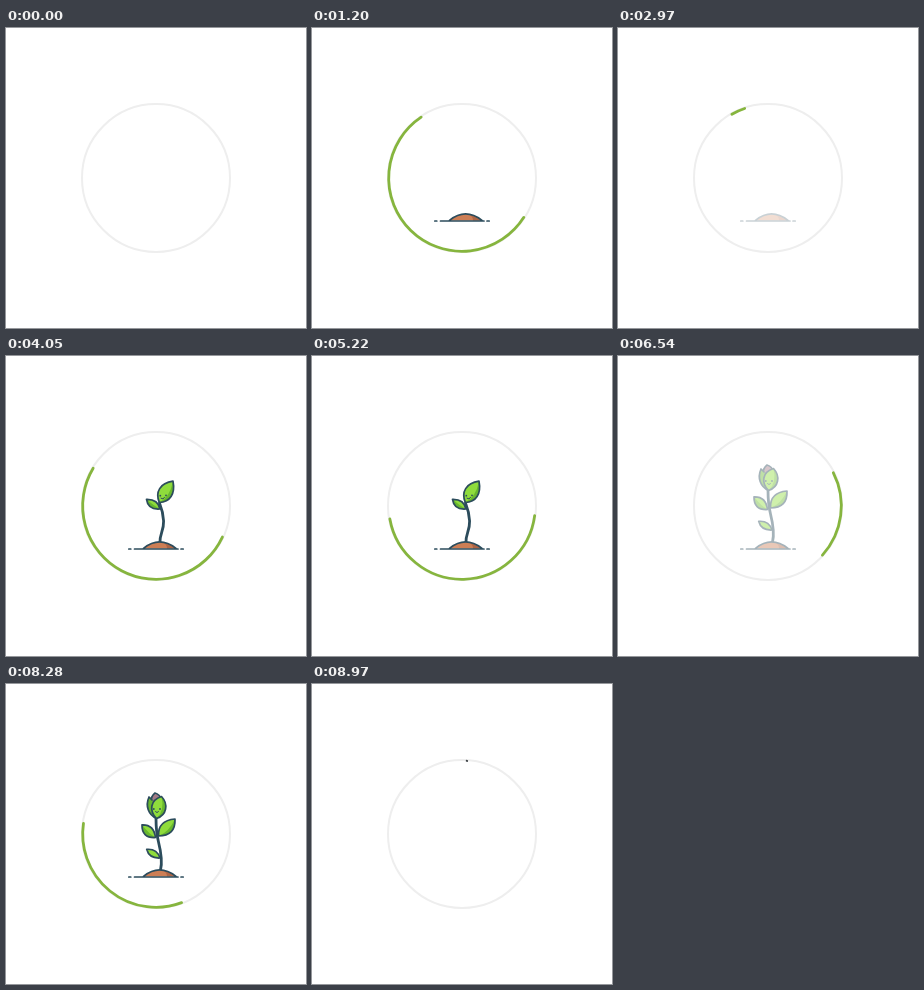
Animation of 300x300 px, one loop 9 s. Source, as an HTML page:

```html
<!DOCTYPE html>
<html lang="en">
<head>
<meta charset="utf-8">
<title>Growing plant loader</title>
<style>
  html, body { margin: 0; height: 100%; overflow: hidden; background: #fff; }
  svg { display: block; width: 100vw; height: 100vh; }
  .line { fill: none; stroke: #2c4c5c; stroke-width: 1.7; stroke-linecap: round; stroke-linejoin: round; }
  .stem { stroke-width: 2.8; }
  .leaf { fill: #8fdc3c; }
  .shade { fill: #68b72e; }
  .face { stroke-width: 1; }
</style>
</head>
<body>
<svg viewBox="0 0 300 300">
  <circle cx="150" cy="150" r="74" fill="none" stroke="#eee" stroke-width="2"/>
  <path id="arc" fill="none" stroke-width="2.8" stroke-linecap="round"/>
  <g id="plant">
    <g class="stage">
    </g>
    <g class="stage">
      <path class="line stem" d="M154 186C153.5 179 158 174 157.6 165C157.3 158 155.5 152 153.5 147"/>
      <path class="leaf" d="M154 153Q152 143 140.5 143.3Q142 154 154 153Z"/>
      <path class="shade" d="M154 153Q148 150 140.5 143.3Q142 154 154 153Z"/>
      <path class="line" d="M154 153Q152 143 140.5 143.3Q142 154 154 153Z"/>
      <path class="leaf" d="M153.3 146.5C149 136 154 127 167 125.2C169.5 138 164 146 153.3 146.5Z"/>
      <path class="shade" d="M153.3 146.5Q164 141 167 125.2C169.5 138 164 146 153.3 146.5Z"/>
      <path class="line" d="M153.3 146.5C149 136 154 127 167 125.2C169.5 138 164 146 153.3 146.5Z"/>
      <path class="line face" d="M155 142.3Q157.5 144.4 158.6 141.3"/>
      <g fill="#2c4c5c"><circle cx="154.3" cy="139.7" r=".9"/><circle cx="160" cy="139.3" r=".9"/></g>
    </g>
    <g class="stage">
      <path class="line stem" d="M154.5 186C157 176 154.5 166 152.5 158C150.5 150 150 143 150 134"/>
      <path class="leaf" d="M154 174Q151 164.5 140.7 165.3Q143 174.5 154 174Z"/>
      <path class="line" d="M154 174Q151 164.5 140.7 165.3Q143 174.5 154 174Z"/>
      <path class="leaf" d="M149.5 153.5C148.5 145 144 140.5 136 140.8C135.8 149.5 140 154 149.5 153.5Z"/>
      <path class="shade" d="M149.5 153.5Q143 150 136 140.8C135.8 149.5 140 154 149.5 153.5Z"/>
      <path class="line" d="M149.5 153.5C148.5 145 144 140.5 136 140.8C135.8 149.5 140 154 149.5 153.5Z"/>
      <path class="leaf" d="M152.5 152C152 142 157 136 169 135C169.5 146 164 152 152.5 152Z"/>
      <path class="shade" d="M152.5 152Q163 148 169 135C169.5 146 164 152 152.5 152Z"/>
      <path class="line" d="M152.5 152C152 142 157 136 169 135C169.5 146 164 152 152.5 152Z"/>
      <path class="line" fill="#a27a86" style="fill:#a27a86" d="M144.5 119Q145 112 149 109Q153.5 110 156 116L150 122Z"/>
      <path class="shade" d="M150.5 134.5C142.5 131 139 122 143 113Q146 114 148 119L155 116Z"/>
      <path class="line" d="M150.5 134.5C142.5 131 139 122 143 113L146 116"/>
      <path class="leaf" d="M150.5 134.5C143 127 144 116 155.5 112.5C162.5 120 161 131 150.5 134.5Z"/>
      <path class="shade" d="M150.5 134.5Q159 127 155.5 112.5C162.5 120 161 131 150.5 134.5Z"/>
      <path class="line" d="M150.5 134.5C143 127 144 116 155.5 112.5C162.5 120 161 131 150.5 134.5Z"/>
      <path class="line face" d="M149.5 127.7Q151 129.7 152.5 127.7"/>
      <g fill="#2c4c5c"><circle cx="147.8" cy="125" r=".9"/><circle cx="154" cy="125" r=".9"/></g>
    </g>
    <path fill="#cd7e55" d="M137.5 192.5Q153.5 179.5 170 192.5Z"/>
    <path fill="#ad6545" d="M157 186.3Q164 187.5 170 192.5H161Q161 188.5 157 186.3Z"/>
    <path class="line" d="M137.5 192.3Q153.5 179.5 170 192.3M122.8 193h2M128.5 193H172M175 193h2.2"/>
  </g>
</svg>
<script>
const LOOP = 9000, START = 210, CYCLE = 2910, SWEEP = 1820, TAIL_DELAY = 1130;
const RADIUS = 73.3, GREEN = '#86b53e', DARK = '#3d4246';
const arc = document.getElementById('arc');
const plant = document.getElementById('plant');
const stages = document.querySelectorAll('.stage');

const clamp = x => Math.min(1, Math.max(0, x));
const ease = x => (x = clamp(x), x * x * (3 - 2 * x));
const point = deg => {
  const a = deg * Math.PI / 180;
  return `${150 + RADIUS * Math.sin(a)} ${150 - RADIUS * Math.cos(a)}`;
};

function draw(time) {
  const t = time % LOOP - START;
  const phase = t < 30 ? 0 : t % CYCLE;
  const stage = Math.floor(t / CYCLE);

  // The whole ring turns once per cycle while the head and then the tail run round it.
  const turn = 360 * phase / CYCLE;
  const head = turn + 360 * ease(phase / SWEEP);
  const tail = turn + 360 * ease((phase - TAIL_DELAY) / SWEEP);
  const large = head - tail > 180 ? 1 : 0;
  arc.setAttribute('d', `M${point(tail)}A${RADIUS} ${RADIUS} 0 ${large} 1 ${point(head)}`);
  arc.setAttribute('stroke', phase < 45 ? DARK : GREEN);
  arc.setAttribute('stroke-width', phase < 45 ? 2 : 2.8);
  arc.style.display = phase ? '' : 'none';

  plant.style.opacity = Math.min(clamp((phase - 300) / 500), clamp((2880 - phase) / 480));
  stages.forEach((el, i) => el.style.display = i === stage ? '' : 'none');
}

let origin;
function tick(now) {
  origin ??= now;
  draw(now - origin);
  requestAnimationFrame(tick);
}
draw(0);
requestAnimationFrame(tick);
</script>
</body>
</html>
```
